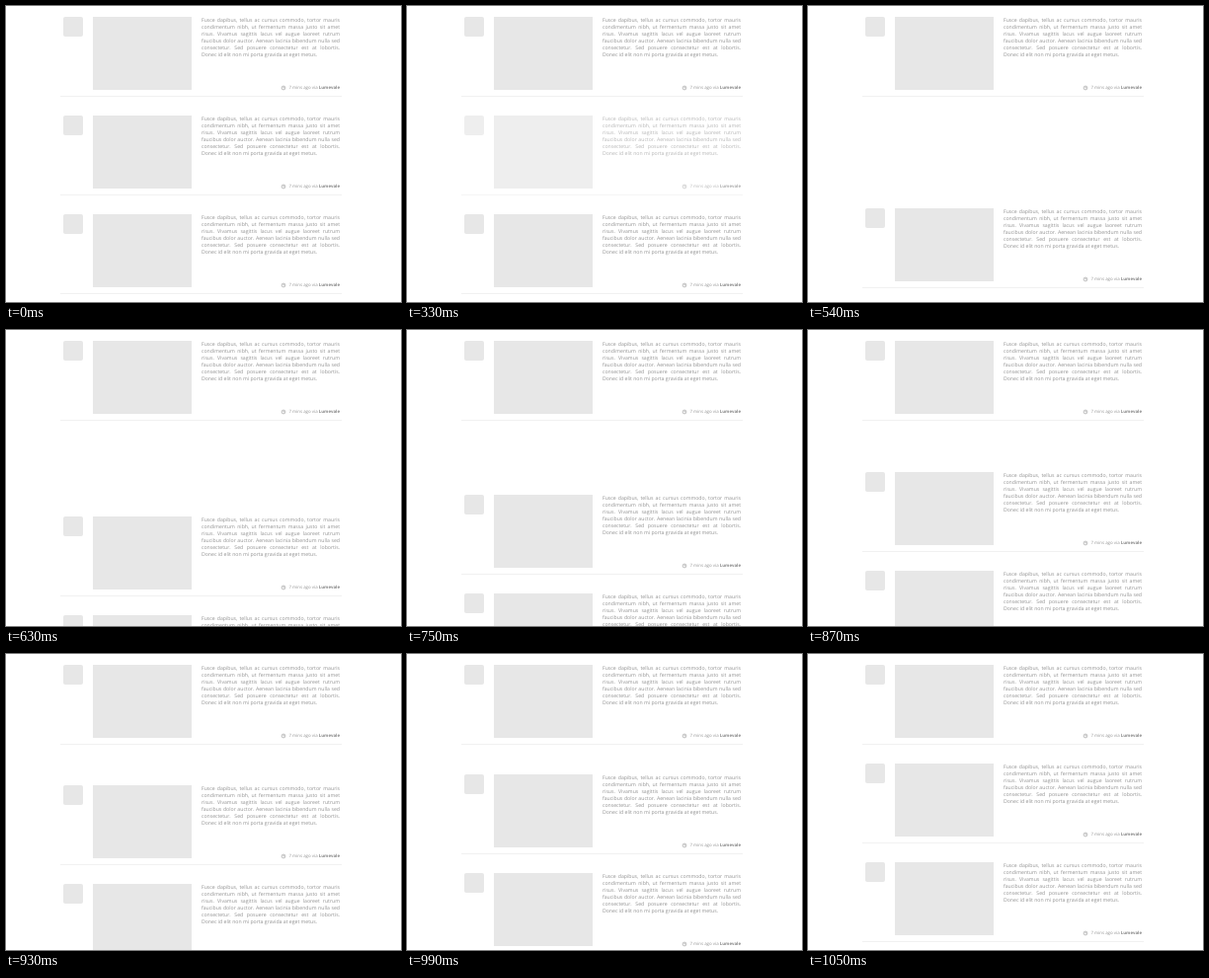
These frames come from a looping animation (400x300 px, 1220 ms). An HTML page:

```html
<!DOCTYPE html>
<html lang="en">
<head>
<meta charset="utf-8">
<title>List item removal</title>
<style>
  @property --shift {
    syntax: "<integer>";
    inherits: false;
    initial-value: 0;
  }

  html, body {
    margin: 0;
    width: 100%;
    height: 100%;
    overflow: hidden;
    background: #fff;
  }

  .stage {
    position: relative;
    width: 400px;
    height: 300px;
    overflow: hidden;
    font-family: "Open Sans", "Noto Sans", sans-serif;
    text-rendering: geometricPrecision;
    color: #929292;
  }

  .slot { position: absolute; left: 0; width: 400px; height: 100px; }
  .first { top: 11px; }
  .removed { top: 111px; animation: fade 1220ms step-end infinite; }
  .rest {
    top: 211px;
    height: 200px;
    transform: translateY(calc(var(--shift) * -1px));
    animation: close-gap 1220ms linear infinite;
  }

  .post { position: relative; height: 100px; }
  .post > * { position: absolute; margin: 0; white-space: nowrap; }
  .avatar { left: 58px; top: 0; width: 20px; height: 20px; border-radius: 2px; background: #e7e7e7; }
  .picture { left: 88px; top: 0; width: 100px; height: 74px; background: #e7e7e7; }
  .copy {
    left: 198px;
    top: 0;
    width: 140px;
    font-size: 5.17px;
    line-height: 7px;
    text-align: justify;
    text-align-last: justify;
  }
  .copy span { display: block; }
  .copy span:last-child { text-align-last: left; }
  .clock { left: 278px; top: 69px; width: 6px; height: 6px; fill: none; stroke: #a4a4a4; stroke-width: .7; }
  .meta { right: 62px; top: 69px; font-size: 4.4px; line-height: 7px; }
  .meta b { color: #888; }
  .rule { left: 55px; top: 80px; width: 285px; height: 1px; background: #f1f1f1; }

  @keyframes fade {
    0% { opacity: 1; }
    27.04% { opacity: .667; }
    34.42% { opacity: .333; }
    41.8%, 100% { opacity: 0; }
  }

  /* The gap closes at an even pace, one step every 30 ms. */
  @keyframes close-gap {
    0% { --shift: 0; }
    41.8% { --shift: 0; animation-timing-function: steps(18); }
    86.06%, 100% { --shift: 100; }
  }
</style>
</head>
<body>
<div class="stage">
  <div class="slot first" data-posts="1"></div>
  <div class="slot removed" data-posts="1"></div>
  <div class="slot rest" data-posts="2"></div>
</div>

<template id="post">
  <div class="post">
    <div class="avatar"></div>
    <div class="picture"></div>
    <p class="copy">
      <span>Fusce dapibus, tellus ac cursus commodo, tortor mauris</span>
      <span>condimentum nibh, ut fermentum massa justo sit amet</span>
      <span>risus. Vivamus sagittis lacus vel augue laoreet rutrum</span>
      <span>faucibus dolor auctor. Aenean lacinia bibendum nulla sed</span>
      <span>consectetur. Sed posuere consectetur est at lobortis.</span>
      <span>Donec id elit non mi porta gravida at eget metus.</span>
    </p>
    <svg class="clock" viewBox="0 0 6 6">
      <circle cx="3" cy="3" r="1.9"/>
      <path d="M3 1.9V3H3.9"/>
    </svg>
    <div class="meta">7 mins ago via <b>Lumevale</b></div>
    <div class="rule"></div>
  </div>
</template>

<script>
  const post = document.getElementById("post").content;
  for (const slot of document.querySelectorAll("[data-posts]")) {
    for (let i = 0; i < +slot.dataset.posts; i++) slot.append(post.cloneNode(true));
  }
</script>
</body>
</html>
```
